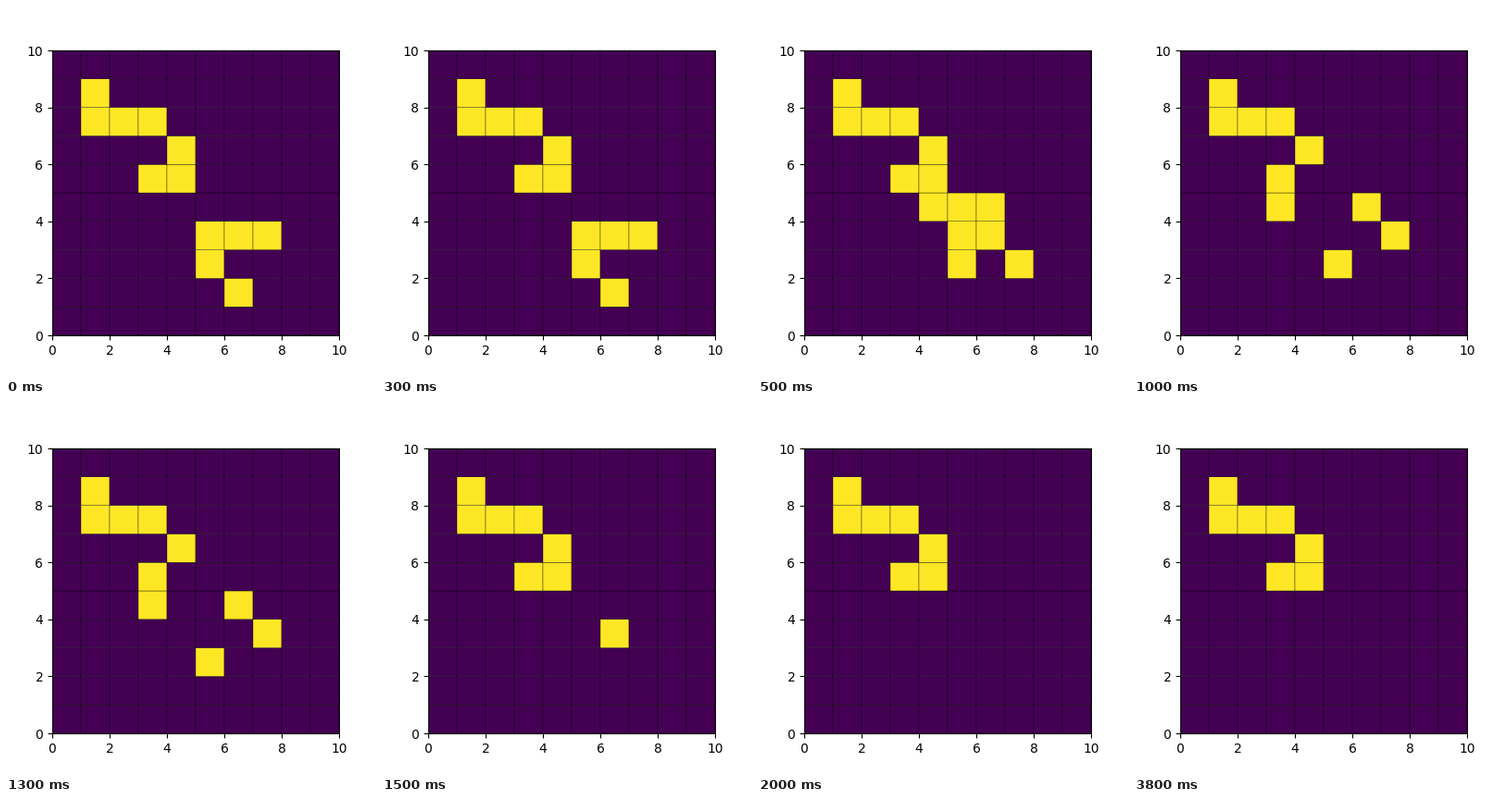
Recreate the animation shown at these times as a matplotlib script. Size 400x400 px, loop 5 s.

```python
import numpy as np
import matplotlib.pyplot as plt
from matplotlib.animation import FuncAnimation

SIZE = 10
STEPS = 10
EATER = "O... OOO. ...O ..OO"
GLIDER = "OOO O.. .O."


def place(board, pattern, left, top):
    """Stamp a pattern whose first row is the topmost one."""
    for drop, row in enumerate(pattern.split()):
        for shift, mark in enumerate(row):
            board[top - drop, left + shift] = mark == "O"


def step(board):
    """Advance Conway's Game of Life by one generation, with dead borders."""
    padded = np.pad(board, 1)
    around = sum(padded[dy:dy + SIZE, dx:dx + SIZE]
                 for dy in range(3) for dx in range(3)) - board
    return ((around == 3) | ((board == 1) & (around == 2))).astype(int)


start = np.zeros((SIZE, SIZE), dtype=int)
place(start, EATER, left=1, top=8)
place(start, GLIDER, left=5, top=3)
generations = [start]
while len(generations) < STEPS:
    generations.append(step(generations[-1]))

fig, ax = plt.subplots(figsize=(4, 4), dpi=100)
cells = ax.pcolor(start, cmap="viridis", vmin=0, vmax=1, edgecolors="k")


def update(frame):
    cells.set_array(generations[frame])
    return [cells]


anim = FuncAnimation(fig, update, frames=STEPS, interval=500, repeat=True)
plt.show()
```
